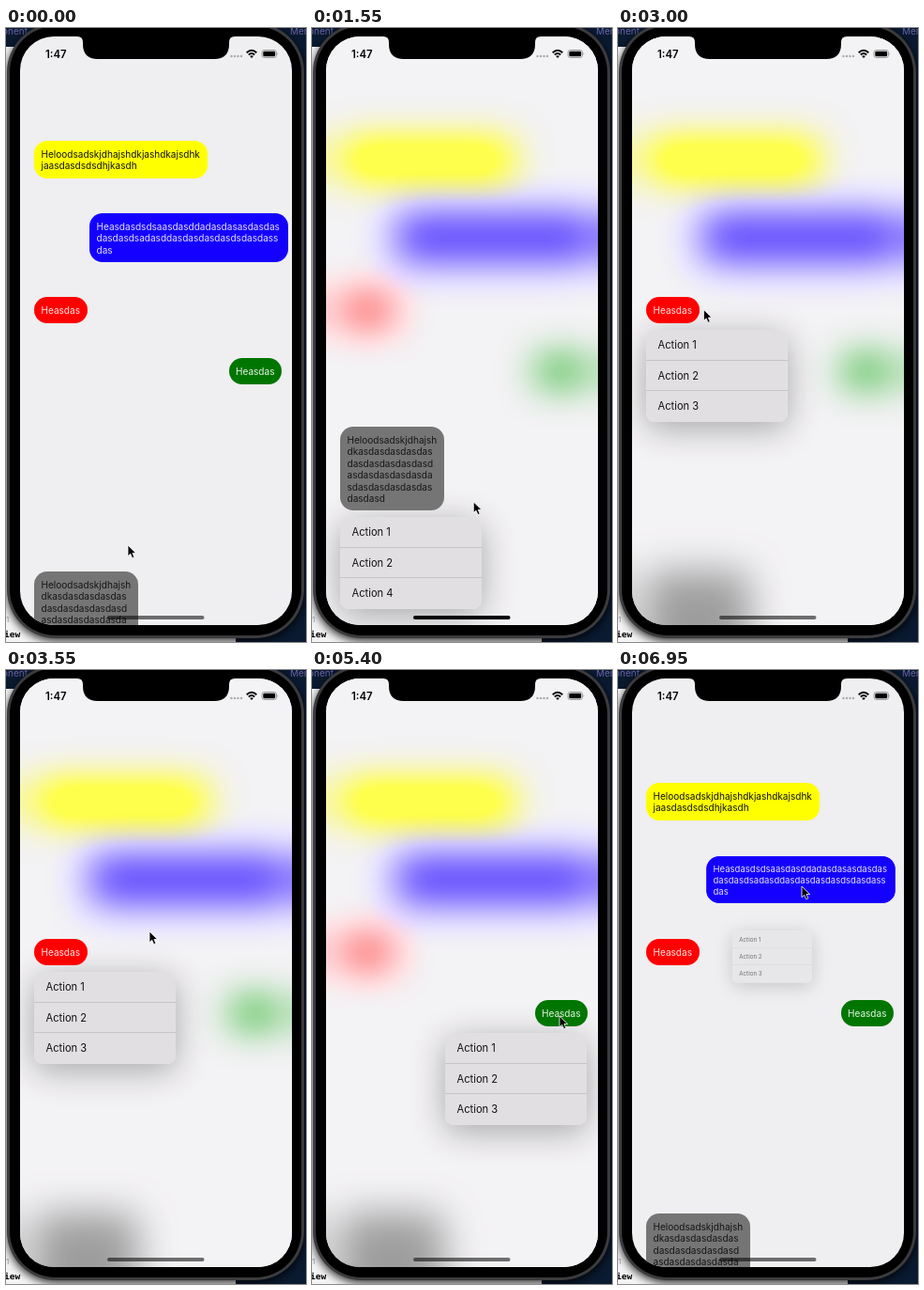
An HTML page for the animation above (7000 ms loop, 320 by 653 pixels).

```html
<!DOCTYPE html>
<html lang="en">
<head>
<meta charset="utf-8">
<title>Context menus</title>
<style>
html, body { margin: 0; width: 100%; height: 100%; overflow: hidden; }
body { position: relative; background: #0a1a30; font-family: Inter, "Liberation Sans", sans-serif; }
svg, #screen, #screen div { position: absolute; }
svg { left: 0; top: 0; }
#phone { filter: drop-shadow(0 3px 5px rgba(0,0,0,.8)); }
#screen { left: 15px; top: 9px; width: 289.5px; height: 626px; border-radius: 36px; overflow: hidden; background: #efeef0; }
#world { left: -15px; top: -9px; width: 320px; height: 653px; }
#haze { left: -80px; top: -80px; width: 480px; height: 813px; background: #efeef0; }
#veil { width: 320px; height: 653px; background: rgba(252,252,252,.3); }
.block, .bubble { border-radius: 14px; }
.bubble { box-sizing: border-box; padding: 7.6px 7.5px 0; font-size: 10.05px; line-height: 12.5px; white-space: pre; }
.menu { width: 151px; height: 98px; border-radius: 9px; background: rgba(223,221,223,.9); box-shadow: 0 7px 36px rgba(0,0,0,.32); font-size: 11.15px; color: #111; }
.menu div { left: 0; width: 138.5px; padding-left: 12.5px; height: 32.67px; line-height: 32.67px; }
.menu div + div { box-shadow: 0 -1px #c6c4c6; }
</style>
</head>
<body>
<svg width="320" height="653">
  <rect y="20" width="30" height="633" fill="#f4f4f5"/>
  <rect y="600" width="245" height="53" fill="#f4f4f5"/>
  <g font-size="10" fill="#6965a8"><text x="-4" y="7">onent</text><text x="303" y="7">Men</text></g>
  <g id="phone">
    <rect x="1" y="-5" width="317" height="654" rx="52" fill="#3b3b3d"/>
    <rect x="4" y="-2" width="311" height="648" rx="49"/>
  </g>
  <text x="0" y="632" font-size="8" fill="#888">1</text>
  <text x="-2" y="648" font-size="9.5" font-weight="700" font-family="DejaVu Sans Mono, monospace">iew</text>
</svg>
<div id="screen"><div id="world"></div></div>
<svg width="320" height="653">
  <path d="M76 8V9Q82 9 82 15V17Q82 33 98 33H222Q238 33 238 17V15Q238 9 244 9V8Z"/>
  <text x="42" y="31.5" font-size="11.4" font-weight="600">1:47</text>
  <path d="M240.5 30h12" stroke="#aaa" stroke-width="2.4" stroke-linecap="round" stroke-dasharray="0 3.5"/>
  <g fill="none" stroke="#000" stroke-width="1.9">
    <path d="M256.7 26.2Q262 21.4 267.3 26.2M258.8 28.5Q262 25.7 265.2 28.5"/>
    <path d="M262 32l-1.9-2.1q1.9-1.5 3.8 0z" fill="#000" stroke="none"/>
  </g>
  <rect x="273" y="23.5" width="15.5" height="8" rx="2.4" fill="none" stroke="#888" stroke-width=".8"/>
  <rect x="274.3" y="24.8" width="12.9" height="5.4" rx="1.3"/>
  <path d="M289.6 26q1.4 1.5 0 3z" fill="#888"/>
  <rect id="home" x="108" y="625" width="103.5" height="4" rx="2"/>
  <path id="cursor" d="M0 0V13L3 10.3L5.2 15.2L7.6 14.2L5.5 9.4H9.6Z" stroke="#fff" stroke-width=".9"/>
</svg>
<script>
const LOOP = 7000;
const LEFT = 15, RIGHT = 305, BOTTOM = 635;
const world = document.getElementById('world');
const home = document.getElementById('home');
const cursor = document.getElementById('cursor');

// open/close are moments in the loop; lift is the vertical travel while open
const bubbles = [
  { x: 30, y: 120, w: 185, h: 40, fill: '#ff0', ink: '#111',
    text: 'Heloodsadskjdhajshdkjashdkajsdhk\njaasdasdsdsdhjkasdh' },
  { x: 89, y: 197, w: 211.5, h: 52, fill: '#1400ff', ink: '#e4e0ff',
    text: 'Heasdasdsdsaasdasddadasdasasdasdas\ndasdasdsadasddasdasdasdasdsdasdass\ndas',
    open: 6910, close: 9000, menuX: 89 },
  { x: 30, y: 286.4, w: 56.5, h: 27.5, fill: '#f00', ink: '#ffe8e8',
    text: 'Heasdas', open: 2650, close: 3850, menuX: 30 },
  { x: 237.5, y: 351, w: 56.5, h: 27.5, fill: '#007600', ink: '#e8f4e8',
    text: 'Heasdas', open: 4985, close: 6100, menuX: 142 },
  { x: 30, y: 578, w: 111, h: 89, fill: '#757575', ink: '#151515',
    text: 'Heloodsadskjdhajsh\ndkasdasdasdasdas\ndasdasdasdasdasd\nasdasdasdasdasda\nsdasdasdasdasdas\ndasdasd',
    open: 800, close: 1700, menuX: 30, lift: 154, last: 4 }
];

// time, x, y of the pointer tip
const path = [
  [0, 130, 550], [600, 107, 592], [1200, 107, 592], [1700, 190, 480], [2350, 76, 305], [2800, 76, 305],
  [3500, 153, 278], [3900, 153, 278], [4500, 264, 368], [5450, 264, 368], [6000, 200, 330],
  [6150, 200, 330], [6650, 196, 230], [LOOP, 196, 230]
];

function smooth(t, from, to) {
  const k = Math.min(1, Math.max(0, (t - from) / (to - from)));
  return k * k * (3 - 2 * k);
}

function box(parent, className, x, y, w, h, css) {
  const el = document.createElement('div');
  el.className = className;
  Object.assign(el.style, { left: x + 'px', top: y + 'px', width: w + 'px', height: h + 'px' }, css);
  return parent.appendChild(el);
}

function layer(id) {
  const el = document.createElement('div');
  el.id = id;
  return world.appendChild(el);
}

function bubbleBox(b) {
  const el = box(world, 'bubble', b.x, b.y, b.w, b.h, { background: b.fill, color: b.ink });
  el.textContent = b.text;
  return el;
}

// The blur reflects at the screen edges, so each block has mirrored twins
function hazeBlocks(b) {
  const mirror = (edge, start, size) => 2 * edge - start - size;
  const spots = [
    [b.x, b.y], [mirror(LEFT, b.x, b.w), b.y], [mirror(RIGHT, b.x, b.w), b.y],
    [b.x, mirror(BOTTOM, b.y, b.h)]
  ];
  return spots.map(([x, y]) => box(haze, 'block', x + 80, y + 80, b.w, b.h, { background: b.fill }));
}

function menuBox(b) {
  const el = box(world, 'menu', b.menuX, b.y - (b.lift || 0) + b.h + 7, 151, 98);
  [1, 2, b.last || 3].forEach((n, i) => {
    const row = document.createElement('div');
    row.textContent = 'Action ' + n;
    row.style.top = i * 32.67 + 'px';
    el.append(row);
  });
  return el;
}

for (const b of bubbles) b.base = bubbleBox(b);
const haze = layer('haze');
const veil = layer('veil');
for (const b of bubbles) {
  b.blocks = hazeBlocks(b);
  if (!b.open) continue;
  b.menu = menuBox(b);
  b.live = bubbleBox(b);
}

function show(el, opacity, transform = 'none') {
  el.style.visibility = opacity > 0 ? 'visible' : 'hidden';
  el.style.opacity = opacity;
  el.style.transform = transform;
}

function draw(t) {
  const active = bubbles.find(b => b.open && t >= b.open - 150 && t < b.close + 350);
  const age = active ? t - active.open : 0;
  const leaving = active ? smooth(t, active.close, active.close + 320) : 0;
  const blur = active ? smooth(age, 150, 300) * (1 - leaving) : 0;
  haze.style.display = blur > 0 ? 'block' : 'none';
  haze.style.opacity = Math.min(1, 4 * blur);
  haze.style.filter = `blur(${20 * blur}px) saturate(${1 + .8 * blur})`;
  veil.style.opacity = blur;

  for (const b of bubbles) {
    for (const block of b.blocks) block.style.display = b === active ? 'none' : 'block';
    if (b !== active) {
      show(b.base, 1);
      if (b.menu) { show(b.menu, 0); show(b.live, 0); }
      continue;
    }
    const shrink = Math.min(.1, 10.7 / b.w);
    const pressed = 1 - shrink * smooth(age, -150, 0);
    const raised = smooth(age, 50, 150);
    const y = -(b.lift || 0) * raised * (1 - leaving);
    show(b.base, 1 - smooth(age, 150, 300), `scale(${pressed})`);
    show(b.live, age >= 0 ? 1 : 0, `translateY(${y}px) scale(${pressed + (1 - pressed) * raised})`);
    const grown = age > 0 ? 1 - Math.exp(-age / 50) : 0;
    const fade = 1 - smooth(t, b.close, b.close + 220);
    show(b.menu, grown * fade, `scale(${grown * (1 - .8 * leaving)})`);
  }

  home.style.opacity = .55 + .45 * smooth(t, 750, 900) * (1 - smooth(t, 2600, 2900));
  const i = path.findIndex(p => p[0] > t);
  const [t0, x0, y0] = path[i - 1], [t1, x1, y1] = path[i];
  const k = smooth(t, t0, t1);
  cursor.setAttribute('transform', `translate(${x0 + (x1 - x0) * k} ${y0 + (y1 - y0) * k}) scale(.9)`);
}

function tick() {
  draw(performance.now() % LOOP);
  requestAnimationFrame(tick);
}
tick();
</script>
</body>
</html>
```
